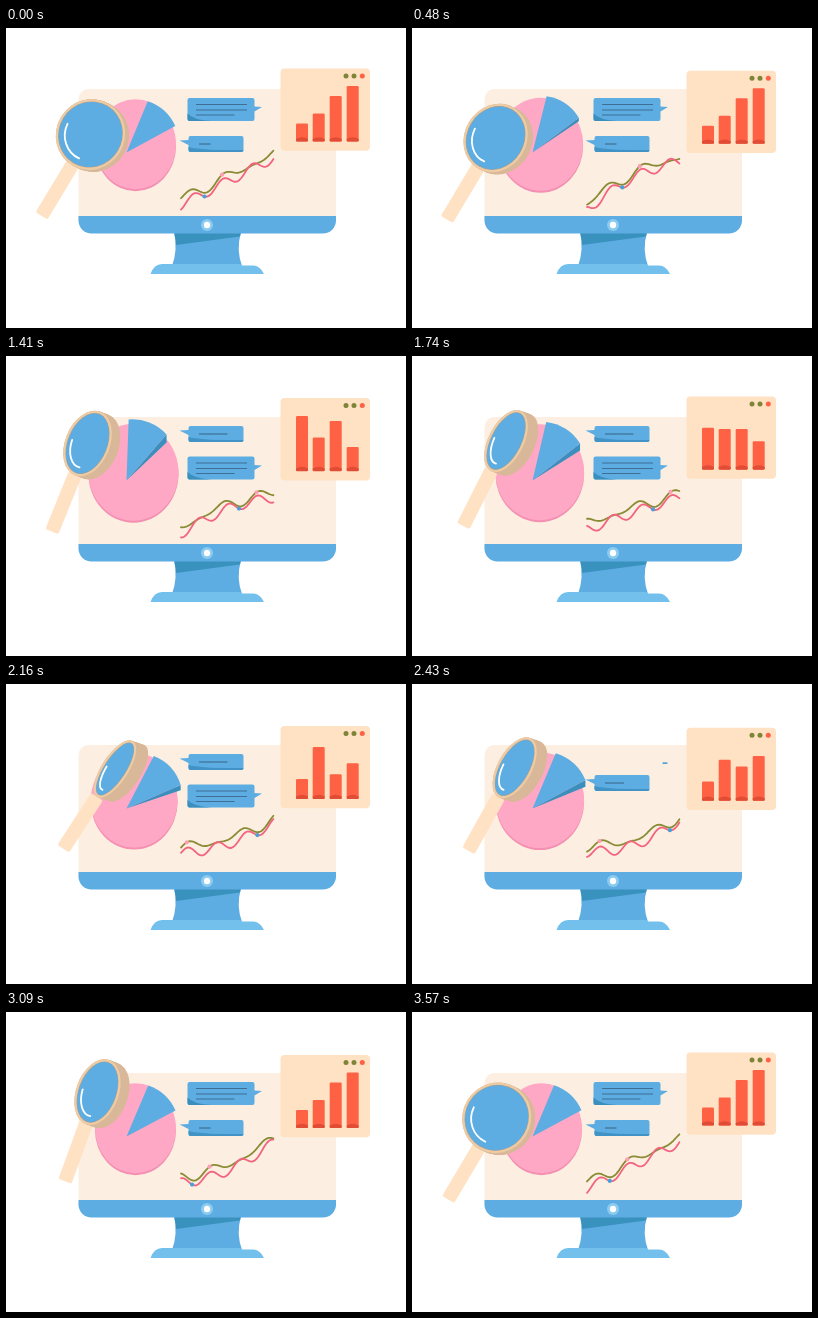
Write an HTML page that moves like this. It is 400x300 px and loops after 3.6 s.

```html
<!DOCTYPE html>
<html lang="en">
<head>
<meta charset="utf-8">
<title>Data analysis</title>
<style>
html, body { margin: 0; width: 100%; height: 100%; overflow: hidden; background: #fff; }
svg { display: block; width: 100vw; height: 100vh; }
</style>
</head>
<body>
<svg viewBox="0 0 400 300">
  <path d="M168 204H235Q230 222 236 238H166Q172 222 168 204Z" fill="#5dade2"/>
  <path d="M168 204H235L234 208.500L170 217Q170 211 168 204Z" fill="#3992bd"/>
  <path d="M144.500 246Q148 236 156 236H234L236 237.500H247Q254 237.500 258 246Z" fill="#74c0ed"/>
  <rect x="72.500" y="61" width="257.500" height="140" rx="10" fill="#fcefe1"/>
  <path d="M72.500 188H330V192.500a13 13 0 0 1-13 13H85.500a13 13 0 0 1-13-13Z" fill="#5dade2"/>
  <circle cx="201" cy="197" r="6" fill="#8bcbf2"/>
  <circle cx="201" cy="197" r="3.200" fill="#fff"/>

  <ellipse id="pieSide" fill="#f48fb1"/>
  <ellipse id="pie" fill="#ffa8c6"/>
  <path id="sliceSide" fill="#3b8fbd"/>
  <path id="slice" fill="#5dade2"/>

  <g id="big">
    <path d="M2 0H65Q67 0 67 2V8.500L74.500 9L67 13.500V21Q67 23 65 23H2Q0 23 0 21V2Q0 0 2 0Z" fill="#5dade2"/>
    <path d="M0 15.500Q6 22 24 23H2Q0 23 0 21Z" fill="#3b8fbd"/>
    <path d="M8.500 6.500H59.500M8.500 12H59.500M8.500 17H47" stroke="#3f6f95" stroke-width="1.200"/>
  </g>
  <g id="small">
    <path d="M2 0H53Q55 0 55 2V14Q55 16 53 16H2Q0 16 0 14V9L-9 4.500L0 4V2Q0 0 2 0Z" fill="#5dade2"/>
    <path d="M0 11Q12 14.500 55 14Q55 16 53 16H2Q0 16 0 14Z" fill="#4093c4"/>
    <path id="dash" stroke="#3f6f95" stroke-width="1.200"/>
  </g>

  <g fill="none" stroke-width="1.800" stroke-linecap="round" stroke-linejoin="round">
    <path id="olive" stroke="#8a8b35"/>
    <path id="rose" stroke="#f2647f"/>
  </g>
  <circle id="blueDot" r="2.100" fill="#4a9fd8"/>
  <circle id="pinkDot" r="2.100" fill="#ff9fb4"/>

  <g id="win">
    <rect x="274.500" y="40.500" width="89.500" height="82.300" rx="4" fill="#ffe2c4"/>
    <circle cx="340" cy="48" r="2.500" fill="#7f8538"/>
    <circle cx="348" cy="48" r="2.500" fill="#7f8538"/>
    <circle cx="356.300" cy="48" r="2.500" fill="#ff6145"/>
    <g id="bars"></g>
  </g>

  <g id="glass">
    <rect x="-7" y="33" width="14" height="62" rx="2" fill="#ffe2c4"/>
  </g>
  <g id="rim" fill="#d8b898"></g>
  <g id="face">
    <ellipse id="ring" fill="#edcba4"/>
    <ellipse id="edge" fill="#b99f85"/>
    <ellipse id="lens" fill="#5dade2"/>
    <path id="shine" fill="none" stroke="#fff" stroke-width="1.800" stroke-linecap="round"/>
  </g>
</svg>
<script>
const LOOP = 3600;
const { PI, sin, cos } = Math;
const $ = id => document.getElementById(id);
const set = (el, attrs) => { for (const k in attrs) el.setAttribute(k, attrs[k]); };
const make = (tag, parent) =>
  parent.appendChild(document.createElementNS('http://www.w3.org/2000/svg', tag));
const mix = (a, b, u) => a + (b - a) * u;
const rad = deg => deg * PI / 180;

// Eased 0 to 1 between two times
function ease(t, from, to) {
  const u = Math.min(1, Math.max(0, (t - from) / (to - from)));
  return u * u * (3 - 2 * u);
}

// Key poses and the smooth periodic curve through them
const TIMES = [0, 870, 1410, 2160, 2670, 3090];
const GLASS = { // centre, lens half width, lean
  x: [84.5, 83.5, 81.5, 109, 94, 91.5],
  y: [106.5, 106.5, 87.5, 85, 82.5, 80],
  rx: [31.5, 23.5, 19.5, 10.5, 18.5, 18.5],
  lean: [31, 28.5, 22, 33, 24, 20]
};
const SLICE = { // middle direction, how far it stands out
  angle: [-48, -63.5, -68.5, -43, -53.5, -47.5],
  lift: [0, .8, 1, .65, .9, 0]
};

function flow(values, t) {
  const n = TIMES.length;
  const time = i => TIMES[(i + n) % n] + LOOP * Math.floor(i / n);
  const value = i => values[(i + n) % n];
  let i = n - 1;
  while (TIMES[i] > t) i--;
  const h = time(i + 1) - time(i), u = (t - time(i)) / h;
  const slope = k => (value(k + 1) - value(k - 1)) / (time(k + 1) - time(k - 1)) * h;
  return mix(value(i), value(i + 1), u * u * (3 - 2 * u))
    + slope(i) * u * (1 - u) ** 2 - slope(i + 1) * u * u * (1 - u);
}

const bars = [290, 306.7, 323.7, 340.7].map(x => {
  const body = make('rect', $('bars')), foot = make('path', $('bars'));
  set(body, { x, width: 12, rx: 1.2, fill: '#ff6145' });
  set(foot, { d: `M${x} 111q6 -3.500 12 0v1.500q0 1.100 -1 1.100h-10q-1 0 -1 -1.100Z`, fill: '#e04c34' });
  return body;
});
const HEIGHTS = [[18, 28, 45.5, 55.5], [55, 33.5, 50, 24], [20, 52, 24.5, 35.5]];

function drawWindow(t) {
  set($('win'), { transform: `translate(0 ${2 - 2 * cos(t / 900 * PI)})` });
  const [a, b, c] = HEIGHTS;
  bars.forEach((bar, i) => {
    const height = a[i] + (b[i] - a[i]) * ease(t, 500, 1070)
      + (c[i] - b[i]) * ease(t, 1500, 2080)
      + (a[i] - c[i]) * ease(t, 2150, 2740);
    set(bar, { y: 113.5 - height, height });
  });
}

const rims = Array.from({ length: 10 }, () => make('ellipse', $('rim')));

function drawGlass(t) {
  const x = flow(GLASS.x, t), y = flow(GLASS.y, t);
  const rx = flow(GLASS.rx, t), lean = flow(GLASS.lean, t);
  const ry = 29 + rx / 8, turn = 31.5 - rx;
  const place = (dx, dy) => `translate(${x + dx} ${y + dy}) rotate(${lean})`;
  const outer = { rx: rx + 2.8, ry: ry + 2.8 };
  rims.forEach((el, i) => {
    const u = i / (rims.length - 1);
    set(el, { ...outer, transform: place((4 + turn * .38) * u, (2 + turn * .1) * u) });
  });
  set($('glass'), { transform: place(0, 0) });
  set($('face'), { transform: place(0, 0) });
  set($('ring'), outer);
  set($('edge'), { rx: rx + .5, ry: ry + .5 });
  set($('lens'), { rx, ry });
  const X = rx * .8, Y = ry * .8;
  set($('shine'), { d: `M${.1 * X} ${Y}A${X} ${Y} 0 0 1 ${-X} ${.1 * Y}` });
}

function drawPie(t) {
  const angle = flow(SLICE.angle, t), lift = Math.max(0, flow(SLICE.lift, t));
  const size = { cx: 129.5 - 2 * lift, rx: 40.5 + 4.5 * lift, ry: 45 + 3.5 * lift };
  set($('pieSide'), { ...size, cy: 118.2 });
  set($('pie'), { ...size, cy: 116.2 });
  const r = 55.5 + 5.5 * lift, tip = '120.5 124.5';
  const corner = a => [120.5 + r * cos(rad(a)), 124.5 + r * sin(rad(a))];
  const [px, py] = corner(angle - 19.5), [qx, qy] = corner(angle + 19.5);
  set($('slice'), { d: `M${tip}L${px} ${py}A46 46 0 0 1 ${qx} ${qy}Z` });
  set($('sliceSide'), { d: `M${tip}L${qx} ${qy}v${8 * lift}Z` });
}

// The bubbles trade places: one slides, the other shrinks and grows back
function drawBubbles(t) {
  const slide = ease(t, 480, 970) - ease(t, 2190, 2640);
  set($('small'), { transform: `translate(182.500 ${mix(108, 70, slide)})` });
  set($('dash'), { d: `M10.500 8H${mix(22, 39, slide)}` });
  const swap = ease(t, 480, 1040) - ease(t, 2190, 2650);
  const scale = Math.abs(1 - 2 * swap), low = swap > .5;
  set($('big'), {
    transform: `translate(256 ${low ? 109.5 + 10 * (1 - scale) : 79})
      rotate(${low ? -8 * (1 - scale) : 0}) scale(${scale}) translate(-74.500 -9)`
  });
}

// Rising trend, a slow swell, and ripples that drift right
const DRIFT = 88;
const ripple = (s, crest, waves) => -cos((s - crest) * waves * 2 * PI / DRIFT);

function heightAt(x, t, rose) {
  const phase = t / LOOP * 2 * PI;
  const u = (x - 175) / 92, s = x - DRIFT * t / LOOP;
  const start = 169 + 7 * sin(phase + .3) + (rose ? 6 : 0);
  const end = 132 - 6 * cos(phase + .3) + (rose ? 4 : 0);
  const swell = (rose ? 10 : 9) * sin(phase) * sin(PI * u);
  const waves = rose ? 5 * ripple(s, 217, 3)
    : 3.5 * ripple(s, 179, 2) + 2.5 * ripple(s, 187, 3);
  return mix(start, end, u) - swell + waves;
}

function drawLine(id, t, rose) {
  const pts = Array.from({ length: 61 }, (_, i) => {
    const x = 175 + i * 1.54;
    return x.toFixed(2) + ' ' + heightAt(x, t, rose).toFixed(2);
  });
  set($(id), { d: 'M' + pts.join('L') });
}

function drawDot(id, t, rose, from) {
  const x = 174 + (from - 174 + DRIFT * t / LOOP) % DRIFT;
  set($(id), { cx: x, cy: heightAt(x, t, rose), opacity: x > 178 && x < 260 ? 1 : 0 });
}

function draw(t) {
  drawPie(t);
  drawGlass(t);
  drawBubbles(t);
  drawLine('olive', t, false);
  drawLine('rose', t, true);
  drawDot('blueDot', t, true, 198.5);
  drawDot('pinkDot', t, false, 216);
  drawWindow(t);
}

const start = performance.now();
function tick() {
  draw((performance.now() - start) % LOOP);
  requestAnimationFrame(tick);
}
tick();
</script>
</body>
</html>
```
